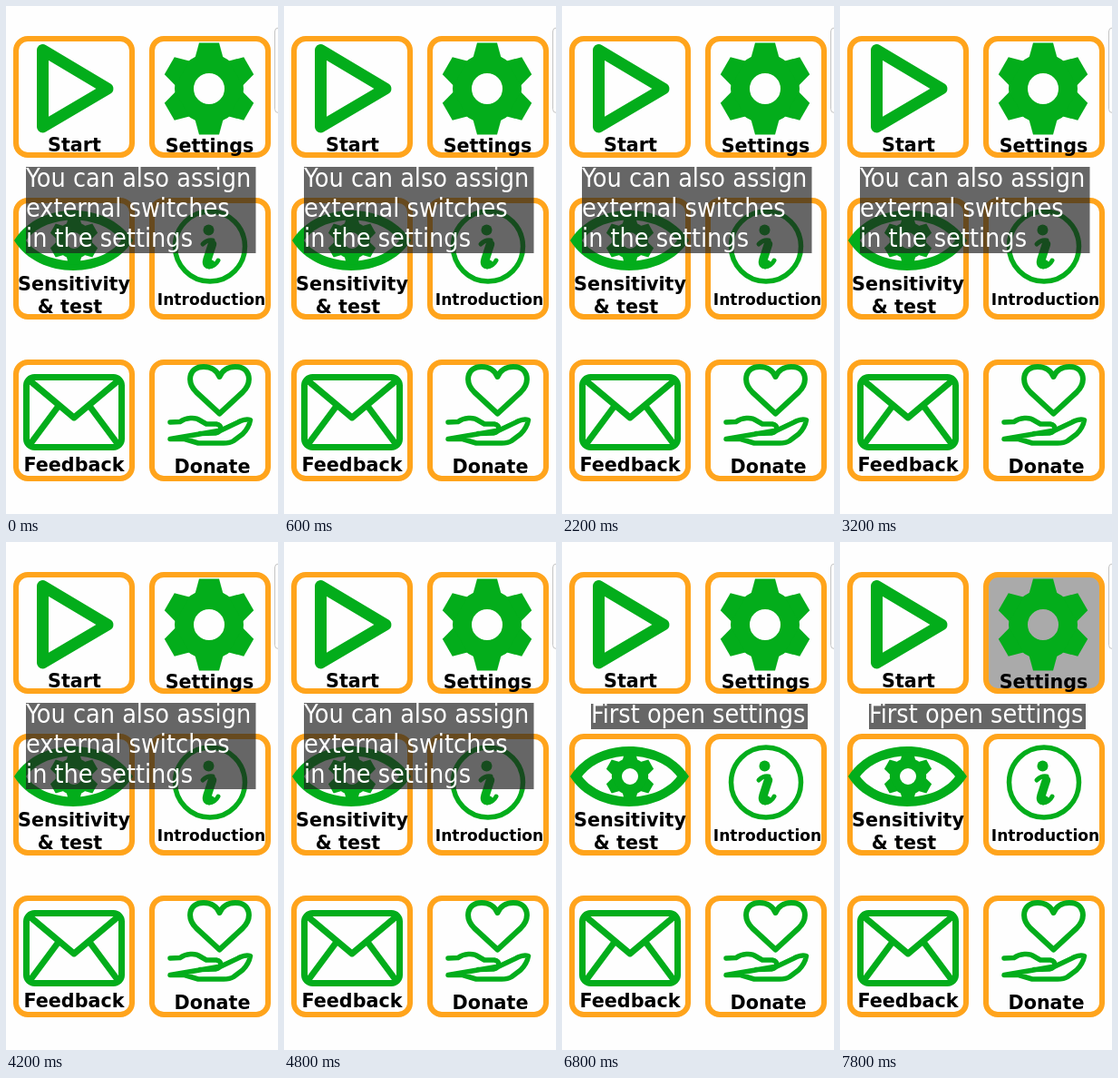
An HTML page that plays this animation: 300x559 px, repeating every 8 s.

```html
<!DOCTYPE html>
<html lang="en">
<head>
<meta charset="utf-8">
<title>Home menu guide</title>
<style>
html, body { margin: 0; width: 100%; height: 100%; overflow: hidden; background: #fefefe; }
svg { display: block; width: 100vw; height: 100vh; }
.tile { fill: #fefefe; stroke: #ffa41c; stroke-width: 6; }
.line { fill: none; stroke: #03ad1b; stroke-linejoin: round; stroke-linecap: round; }
.solid { fill: #03ad1b; }
.label { font: bold 20.7px "DejaVu Sans", sans-serif; text-anchor: middle; }
.caption { font: 28.5px "DejaVu Sans Condensed", "Noto Sans", sans-serif; fill: #fff; }
.shade { fill: #202020; fill-opacity: .68; }
</style>
</head>
<body>
<svg viewBox="0 0 300 559" preserveAspectRatio="none">
  <defs>
    <path id="tooth" d="M-15.5-34L-11-50.5H11L15.5-34Z"/>
    <g id="gear">
      <circle r="27.5" fill="none" stroke="#03ad1b" stroke-width="21"/>
      <g id="teeth" class="solid"></g>
    </g>
  </defs>

  <rect x="296.5" y="24" width="20" height="93.5" rx="4" fill="#fefefe" stroke="#c4c4c4"/>
  <g id="tiles"></g>

  <path class="line" stroke-width="13" d="M40.5 48.5V133L112 91Z"/>
  <use href="#gear" x="224" y="91"/>

  <path class="solid" d="M9 258C36 214 112 214 140 258C112 302 36 302 9 258Z"/>
  <path fill="#fefefe" d="M22 258C44 228 105 228 127 258C105 288 44 288 22 258Z"/>
  <use href="#gear" transform="translate(75 258) scale(.53)"/>

  <circle class="line" stroke-width="5.5" cx="225" cy="264.5" r="38.5"/>
  <circle class="solid" cx="223.5" cy="246.5" r="6"/>
  <path class="line" stroke-width="5" d="M217 262Q222 257 228 258"/>
  <path class="line" stroke-width="9.5" d="M227.5 262L222 279Q220 286 226 284"/>
  <path class="line" stroke-width="5" d="M224 287Q231 286 234 280"/>

  <g class="line" stroke-width="7">
    <rect x="22.5" y="408.5" width="105" height="77" rx="9"/>
    <path d="M26 412L75 453L124 412M26 483L58 440M124 483L92 440"/>
  </g>

  <path class="line" stroke-width="6" d="M235.5 448.5L210 425C199 414 201 397 218 397C227 397 233 402 235.5 408C238 402 244 397 253 397C270 397 272 414 261 425Z"/>
  <path class="line" stroke-width="5.5" d="M181 458L192 457.5C198 453 209 452 214 456L221 460H232C239 461 238 469 231 470L214 470.5M237 467L259 456.5Q265 454 269.5 455.5Q268 464 261 471L251 478.5Q247 481 240 481H212L197 476.5H181Z"/>

  <g id="labels"></g>
  <g id="captions"></g>
</svg>
<script>
const LOOP = 8000, CAPTION_CHANGE = 5200, PRESS = 7600, PRESS_FULL = 7800;
const find = id => document.getElementById(id);

function add(parent, tag, attributes, text = "") {
  const node = document.createElementNS("http://www.w3.org/2000/svg", tag);
  for (const [key, value] of Object.entries(attributes)) node.setAttribute(key, value);
  node.textContent = text;
  return parent.appendChild(node);
}

for (let angle = 0; angle < 360; angle += 60)
  add(find("teeth"), "use", { href: "#tooth", transform: `rotate(${angle})` });

const tiles = [36, 214, 392].flatMap(y => [11, 161].map(x =>
  add(find("tiles"), "rect", { class: "tile", x, y, width: 128, height: 128, rx: 13 })));
const settingsTile = tiles[1];

for (const [text, x, y, size = 20.7] of [
  ["Start", 75.5, 160], ["Settings", 224.5, 161],
  ["Sensitivity", 75, 313], ["& test", 70.5, 338],
  ["Introduction", 226.5, 329, 17.1],
  ["Feedback", 75, 512], ["Donate", 227.5, 514]
]) add(find("labels"), "text", { class: "label", x, y, style: `font-size:${size}px` }, text);

function caption(x, y, width, height, lines) {
  const group = add(find("captions"), "g", {});
  add(group, "rect", { class: "shade", x, y, width, height });
  lines.forEach((line, i) =>
    add(group, "text", { class: "caption", x, y: 199 + 33 * i }, line));
  return group;
}

const switchHint = caption(22, 177, 253.5, 95,
  ["You can also assign", "external switches", "in the settings"]);
const openHint = caption(32, 178, 239, 28, ["First open settings"]);

function draw(now) {
  const time = now % LOOP;
  const changed = time >= CAPTION_CHANGE;
  switchHint.style.display = changed ? "none" : "";
  openHint.style.display = changed ? "" : "none";
  settingsTile.style.fill = time >= PRESS_FULL ? "#aaa" : time >= PRESS ? "#ccc" : "";
  requestAnimationFrame(draw);
}
requestAnimationFrame(draw);
</script>
</body>
</html>
```
